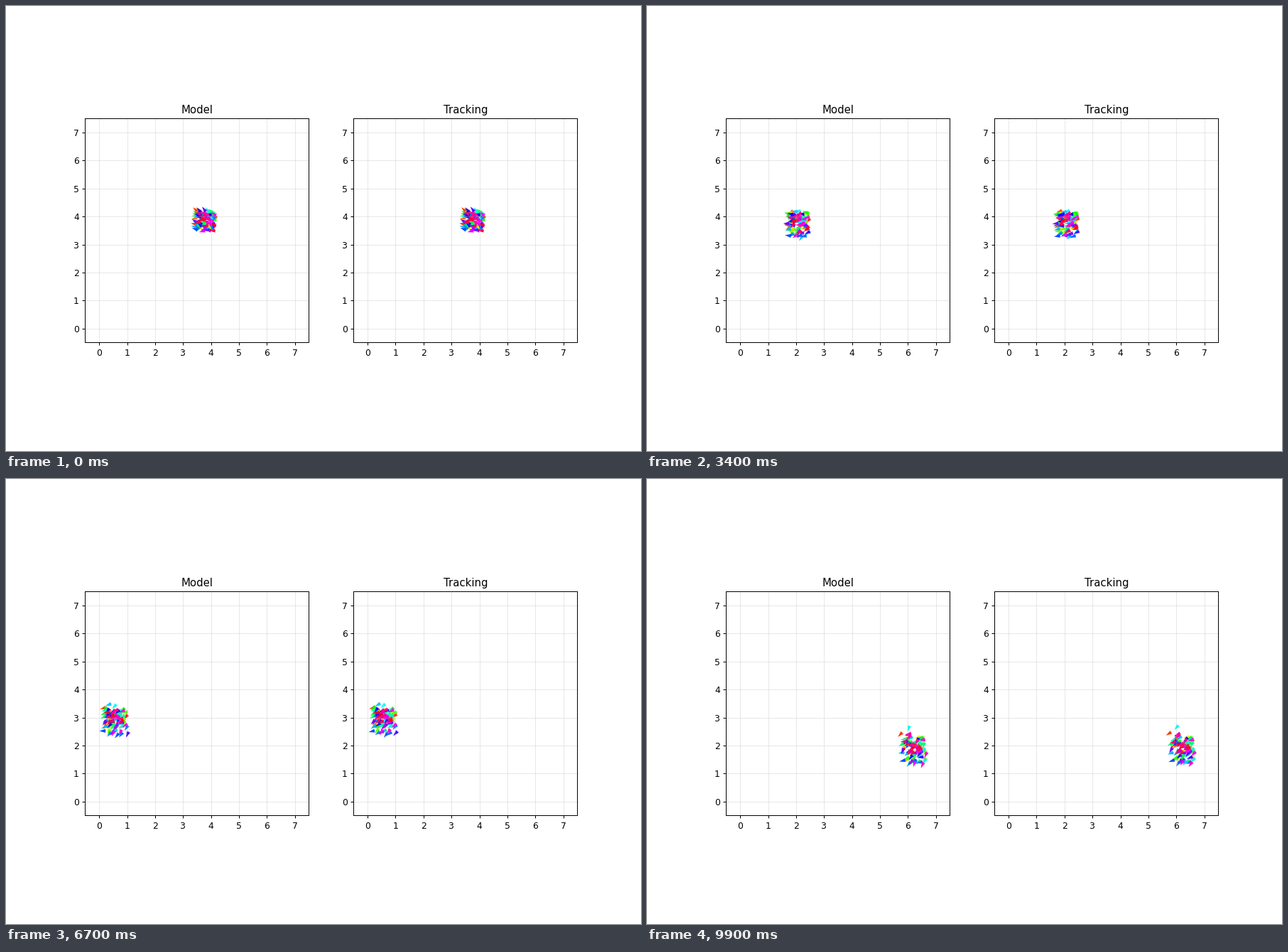
A matplotlib script for the animation above (10000 ms loop, 894x626 px).

```python
import numpy as np
import matplotlib.pyplot as plt
from matplotlib.animation import FuncAnimation
from numpy.polynomial import Polynomial

W, H, DPI = 894, 626, 89.4
FRAMES, INTERVAL = 100, 100
N, BOX, SPEED, NOISE, GAIN = 100, 7.0, 0.058, 0.64, 0.52

# Path of the swarm's centre, x not yet wrapped
PATH_X = Polynomial([3.85, -0.0525, 6.3e-5])
PATH_Y = Polynomial([3.85, 0.01653, -6.1e-4, 2.5e-6])


def simulate():
    """Return wrapped positions (FRAMES, N, 2) and headings (FRAMES, N)."""
    rng = np.random.default_rng(11)
    t = np.arange(FRAMES)
    centre = np.stack([PATH_X(t), PATH_Y(t)], axis=1)
    course = np.arctan2(PATH_Y.deriv()(t), PATH_X.deriv()(t)) % (2 * np.pi)
    heading = course[:, None] + rng.uniform(-NOISE, NOISE, (FRAMES, N))

    start = rng.uniform(-BOX / 20, BOX / 20, (N, 2))
    step = SPEED * unit(heading)
    step[0] = 0
    spread = start + np.cumsum(step, axis=0)
    spread -= spread.mean(axis=1, keepdims=True)
    return (centre[:, None] + spread) % BOX, heading


def unit(angle):
    return np.stack([np.cos(angle), np.sin(angle)], axis=-1)


def track(seen, drift):
    """Predict half a step ahead, then blend in the observation."""
    est = seen.copy()
    for k in range(1, len(seen)):
        est[k] = (1 - GAIN) * (est[k - 1] + drift[k] / 2) + GAIN * seen[k]
    return est


pos, heading = simulate()
est_pos = track(pos, SPEED * unit(heading))
est_heading = track(heading, np.zeros(FRAMES))

# The tiny extra size keeps rounding from losing a pixel
fig, axes = plt.subplots(1, 2, dpi=DPI,
                         figsize=((W + 1e-6) / DPI, (H + 1e-6) / DPI))
dx, dy = 0.27 / W, 0.27 / H
fig.subplots_adjust(left=0.125 - dx, right=0.9 - dx, bottom=0.11 + dy, top=0.88 + dy)
colors = plt.cm.hsv(np.linspace(0, 1, N))


def make_panel(ax, title, p, a):
    ax.set_title(title)
    ax.set_aspect("equal")
    ax.set(xlim=(-0.5, 7.5), ylim=(-0.5, 7.5), xticks=range(8), yticks=range(8))
    ax.grid(alpha=0.3)
    return ax.quiver(*p[0].T, *unit(a[0]).T, color=colors,
                     scale=35, scale_units="width")


panels = [(make_panel(ax, title, p, a), p, a) for ax, title, p, a in (
    (axes[0], "Model", pos, heading),
    (axes[1], "Tracking", est_pos, est_heading))]


def update(k):
    for arrows, p, a in panels:
        arrows.set_offsets(p[k])
        arrows.set_UVC(*unit(a[k]).T)
    return [arrows for arrows, _, _ in panels]


anim = FuncAnimation(fig, update, frames=FRAMES, interval=INTERVAL,
                     repeat=True, repeat_delay=0, blit=False)
plt.show()
```
